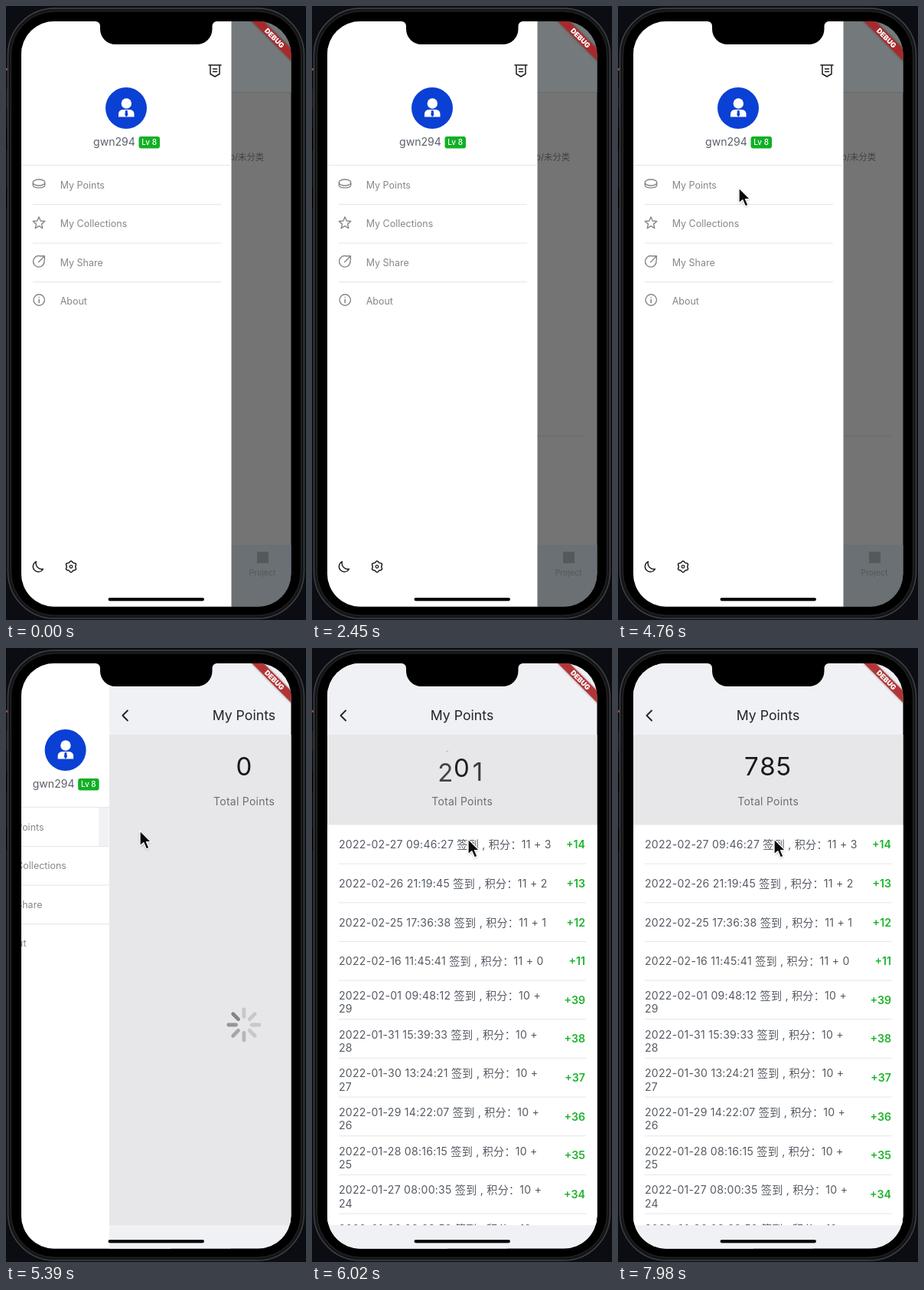
Recreate the animation shown at these times as an HTML page. Size 392 by 800 pixels, loop 8000 ms.

```html
<!DOCTYPE html>
<html lang="en">
<head>
<meta charset="utf-8">
<title>My Points</title>
<style>
  html, body { margin: 0; width: 100%; height: 100%; overflow: hidden; background: #0b0d13; }
  svg { display: block; width: 100vw; height: 100vh; }
  text { font-family: Inter, "Noto Sans CJK SC", "Noto Sans CJK", sans-serif; white-space: pre; }
  .line { fill: none; stroke-linecap: round; stroke-linejoin: round; }
</style>
</head>
<body>
<svg id="stage" viewBox="0 0 392 800" xmlns="http://www.w3.org/2000/svg"></svg>
<script>
const LOOP = 8000, STEP = 70;
const WIDTH = 353;
const PUSH = 5280, PUSH_TIME = 400;
const LOADED = 5597.1, COUNT_TIME = 1653;
const TOTAL = 785;
const DIGIT_H = 39.6, DIGIT_Y = 166;
const ROW_H = 50.65, LIST_Y = 230.5;

const stage = document.getElementById('stage');
const text = (x, y, size, fill, str, extra = '') =>
  `<text x="${x}" y="${y}" font-size="${size}" fill="${fill}" ${extra}>${str}</text>`;
const rect = (x, y, w, h, fill, extra = '') =>
  `<rect x="${x}" y="${y}" width="${w}" height="${h}" fill="${fill}" ${extra}/>`;
const path = (d, color, width = 1.4, extra = '') =>
  `<path class="line" d="${d}" stroke="${color}" stroke-width="${width}" ${extra}/>`;
const repeat = (n, fn) => Array.from({ length: n }, (_, i) => fn(i)).join('');

// Closed outline around a centre; radius is a function of the point index
const ring = (cx, cy, n, radius) => 'M' + Array.from({ length: n }, (_, i) => {
  const a = i / n * 2 * Math.PI, r = radius(i, a);
  return `${(cx + r * Math.sin(a)).toFixed(2)} ${(cy - r * Math.cos(a)).toFixed(2)}`;
}).join('L') + 'Z';

function homePage() {
  return rect(20, 20, WIDTH, 763, '#747474')
    + rect(20, 20, WIDTH, 92, '#74797b')
    + rect(20, 112, WIDTH, 1, '#686a6b')
    + text(337, 201, 11.3, '#414141', 'p/未分类', 'text-anchor="end"')
    + '<path id="dash" d="M294 560.5H357" stroke="#626262" stroke-dasharray="2 1.5"/>'
    + rect(20, 702, WIDTH, 81, '#6a7073')
    + rect(328, 711, 15, 15, '#54595b')
    + text(335, 742, 10.5, '#54595b', 'Project', 'text-anchor="middle"');
}

function drawer() {
  const gray = '#85878b', dark = '#1b1c1e';
  const star = ring(43, 283, 10, i => i % 2 ? 3.7 : 8.2);
  const gear = ring(85, 730.5, 48, (i, a) => 6.5 + .8 * Math.cos(6 * a));
  const items = ['My Points', 'My Collections', 'My Share', 'About'];
  return rect(20, 20, 274.5, 763, '#fff')
    + path('M265 77H281M267 77V88.5L273 92L279 88.5V77M270.5 82H275.5M270.5 85.5H275.5', dark, 1.5)
    + '<circle cx="157" cy="133" r="27" fill="#0b40d4"/>'
    + '<circle cx="157.3" cy="127" r="6.7" fill="#fff"/>'
    + '<path d="M147 144.5V141Q147 135.5 153 135H161.5Q167.5 135.5 167.5 141V144.5Z" fill="#fff"/>'
    + '<path d="M156 136H158.6L159.3 142L157.3 144.5L155.3 142Z" fill="#0b40d4"/>'
    + text(114, 182.4, 14.1, '#5b6069', 'gwn294')
    + rect(173.5, 170, 27.5, 15.5, '#10b024', 'rx="3"')
    + text(187.2, 181.3, 10, '#fff', 'Lv 8', 'text-anchor="middle" font-weight="500"')
    + rect(20, 207, 274.5, 1, '#e8e8ea')
    + repeat(3, i => rect(35, 258 + i * 50.5, 246, 1, '#e6e6e8'))
    + items.map((s, i) => text(70.7, 237.6 + i * 50.6, 12.5, gray, s)).join('')
    + path('M35.2 230A7.8 4 0 0 1 50.8 230A7.8 4 0 0 1 35.2 230V233C35.2 238.2 50.8 238.2 50.8 233V230', gray)
    + path(star, gray)
    + path('M45.5 326A7.3 7.3 0 1 0 50 331.5M42.5 333.8L50 326.3M45.8 325.8H50.4V330.4', gray)
    + '<circle class="line" cx="43.2" cy="383" r="7.2" stroke="' + gray + '" stroke-width="1.4"/>'
    + path('M43.2 382.5V386.6M43.2 379.5V379.6', gray, 1.6)
    + path('M39.5 723.8A7 7 0 1 0 48.5 733.5A7.6 7.6 0 0 1 39.5 723.8Z', dark)
    + path(gear, dark, 1.5)
    + '<circle class="line" cx="85" cy="730.5" r="1.8" stroke="' + dark + '" stroke-width="1.3"/>';
}

const records = [
  ['02-27 09:46:27', 11, 3], ['02-26 21:19:45', 11, 2], ['02-25 17:36:38', 11, 1],
  ['02-16 11:45:41', 11, 0], ['02-01 09:48:12', 10, 29], ['01-31 15:39:33', 10, 28],
  ['01-30 13:24:21', 10, 27], ['01-29 14:22:07', 10, 26], ['01-28 08:16:15', 10, 25],
  ['01-27 08:00:35', 10, 24], ['01-26 08:22:52', 10, 23]
];

function row([stamp, base, extra], i) {
  const y = LIST_Y + i * ROW_H;
  const entry = (dy, str) => text(35, y + dy, 14.1, '#555b64', str, 'letter-spacing=".25"');
  const line = `2022-${stamp} 签到 , 积分：${base} +`;
  const body = base > 10
    ? entry(30.7, `${line} ${extra}`)
    : entry(24.8, line) + entry(42.3, extra);
  return body
    + text(357, y + 30.7, 14.2, '#1db52c', '+' + (base + extra), 'text-anchor="end" font-weight="600"')
    + rect(35, y + ROW_H - .5, 323, 1, '#e6e6e8');
}

const digit = (x, id) => text(x, DIGIT_Y, 33, '#17181a', '0', `id="${id}" text-anchor="middle"`);
const column = i => 174.4 + i * 21;

function pointsPage() {
  return rect(20, 20, WIDTH, 763, '#f0f1f5')
    + rect(20, 113, WIDTH, 639, '#e7e7e9')
    + path('M44 81.5L37.5 88L44 94.5', '#232427', 1.9)
    + text(196, 94, 17.7, '#232427', 'My Points', 'text-anchor="middle"')
    + text(196.2, 205.3, 14, '#6b6e74', 'Total Points', 'text-anchor="middle" letter-spacing=".25"')
    + '<g id="waiting">' + digit(196, 'zero')
    + repeat(8, i => rect(193.6, 468.5, 4.8, 14.5, '#3c3c44',
        `class="tick" rx="2.4" transform="rotate(${i * 45} 196 491)"`)) + '</g>'
    + '<g id="ready"><g clip-path="url(#wheel)">'
    + repeat(3, i => digit(column(i), 'out' + i) + digit(column(i), 'in' + i)) + '</g>'
    + rect(20, LIST_Y, WIDTH, 752 - LIST_Y, '#fff')
    + '<g clip-path="url(#list)">' + records.map(row).join('') + '</g></g>';
}

stage.innerHTML = `
  <defs>
    <clipPath id="screen"><rect x="20" y="20" width="352.5" height="762.5" rx="43"/></clipPath>
    <clipPath id="wheel"><rect x="150" y="134" width="92" height="40"/></clipPath>
    <clipPath id="list"><rect x="20" y="230" width="353" height="522"/></clipPath>
    <filter id="soft" x="-50%" y="-50%" width="200%" height="200%"><feGaussianBlur stdDeviation="1.6"/></filter>
  </defs>
  ${rect(0, 0, 392, 800, '#0b0d13')}
  ${rect(0, 81, 2, 3, '#a4412a')}
  ${rect(0, 108, 3, 26, '#17191d')}${rect(0, 160, 3, 28, '#030303')}${rect(0, 236, 3, 28, '#030303')}
  ${rect(2.5, 3, 387, 795, '#141516', 'rx="61" stroke="#424345" stroke-width="1.4"')}
  ${rect(6.5, 7, 379, 787, '#000', 'rx="57" stroke="#28292b"')}
  <g clip-path="url(#screen)">
    <g id="home">${homePage()}${drawer()}</g>
    ${rect(121, 208, 13, 50, '#f1f0f5', 'id="press"')}
    <g id="points">${pointsPage()}</g>
    <path d="M319.3 18L375 73.7V58.3L334.7 18Z" fill="#000" opacity=".4" filter="url(#soft)"/>
    <path d="M319.3 18L375 73.7V58.3L334.7 18Z" fill="#b82527" opacity=".85"/>
    ${text(0, 3.3, 9.2, '#fff', 'DEBUG', 'text-anchor="middle" font-weight="900" transform="translate(350.8 41.8) rotate(45)"')}
    ${rect(133.5, 771, 125.5, 4.2, '#08080a', 'rx="2.1"')}
  </g>
  <path d="M117 19V20A6 6 0 0 1 123 26V30A20 20 0 0 0 143 50H249.5A20 20 0 0 0 269.5 30V26A6 6 0 0 1 275.5 20V19Z" fill="#000"/>
  <g id="cursor">
    <path d="M0 1V21L4.8 16.8L8.4 25L12 23.4L8.5 15.4H14.5Z" fill="#000" opacity=".35" filter="url(#soft)"/>
    <path d="M0 0V20L4.8 15.8L8.4 24L12 22.4L8.5 14.6H14.5Z" fill="#0a0a0a" stroke="#fff" stroke-width="1.3" stroke-linejoin="round"/>
  </g>`;

const $ = id => document.getElementById(id);
const ticks = [...document.querySelectorAll('.tick')];
const tickAlpha = [47, 47, 47, 47, 72, 97, 122, 147];
const show = (el, on) => el.setAttribute('visibility', on ? 'inherit' : 'hidden');
const shift = (el, x, y = 0) => el.setAttribute('transform', `translate(${x.toFixed(2)} ${y.toFixed(2)})`);
const clamp = v => Math.max(0, Math.min(1, v));

// Cubic Bezier easing, solved by bisection
function bezier(x1, y1, x2, y2) {
  const at = (s, a, b) => 3 * (1 - s) ** 2 * s * a + 3 * (1 - s) * s * s * b + s ** 3;
  return x => {
    if (x <= 0 || x >= 1) return clamp(x);
    let lo = 0, hi = 1;
    for (let i = 0; i < 24; i++) {
      const mid = (lo + hi) / 2;
      if (at(mid, x1, x2) < x) lo = mid; else hi = mid;
    }
    return at(lo, y1, y2);
  };
}
const pushEase = bezier(.35, .91, .33, .97);

// time, x, y of the pointer tip
const track = [
  [4480, 290, 385], [4600, 215, 362], [4690, 172, 285], [4760, 158, 237],
  [5280, 158, 237], [5390, 175, 238], [5800, 204, 249]
];
function pointer(t) {
  const i = track.findIndex(k => k[0] > t);
  if (i < 0) return track[track.length - 1].slice(1);
  if (i === 0) return track[0].slice(1);
  const [a, b] = [track[i - 1], track[i]];
  const u = (t - a[0]) / (b[0] - a[0]);
  return [1, 2].map(k => a[k] + (b[k] - a[k]) * u);
}

function setWheel(i, value) {
  const whole = Math.floor(value), part = value - whole;
  const put = (el, n, y, alpha) => {
    el.textContent = n % 10;
    el.setAttribute('y', (DIGIT_Y + y * DIGIT_H).toFixed(2));
    el.setAttribute('opacity', alpha.toFixed(3));
  };
  put($('out' + i), whole, -part, 1 - part);
  put($('in' + i), whole + 1, 1 - part, part);
}

function render(t) {
  const push = pushEase((t - PUSH) / PUSH_TIME);
  shift($('home'), -WIDTH / 3 * push);
  shift($('points'), WIDTH * (1 - push));
  show($('points'), t >= PUSH);
  show($('press'), t >= PUSH + 60 && t < PUSH + 180);
  show($('dash'), t >= 900);

  const loaded = t >= LOADED;
  show($('waiting'), !loaded);
  show($('ready'), loaded);
  const active = Math.floor(Math.max(0, t - PUSH) / 125);
  ticks.forEach((el, i) =>
    el.setAttribute('opacity', tickAlpha[(((i - active) % 8) + 8) % 8] / 255));
  const p = clamp((t - LOADED) / COUNT_TIME);
  [100, 10, 1].forEach((unit, i) => setWheel(i, Math.floor(TOTAL / unit) * p));

  show($('cursor'), t >= track[0][0]);
  shift($('cursor'), ...pointer(t));
}

// The picture advances in fixed steps; the small lead absorbs timer jitter
const start = performance.now();
function tick() {
  const t = (performance.now() - start) % LOOP;
  render(Math.floor((t + 6) / STEP) * STEP);
  requestAnimationFrame(tick);
}
tick();
</script>
</body>
</html>
```
